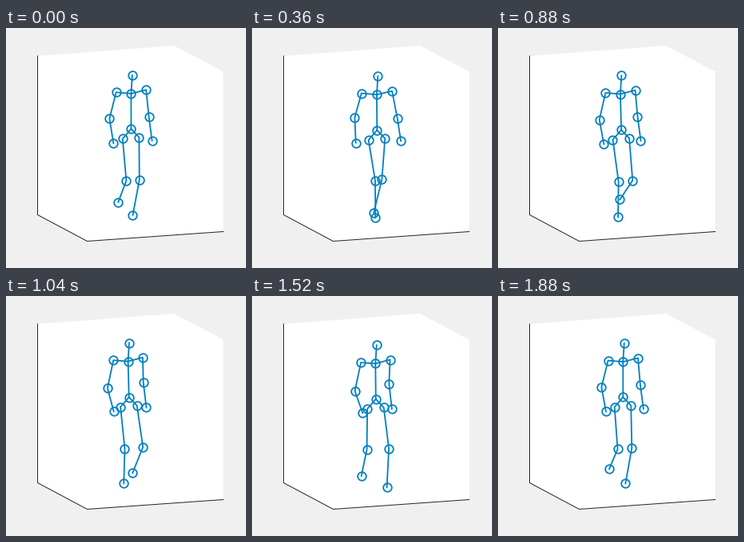
Write a matplotlib script that moves like this. It is 300x300 px and loops after 1920 ms.

```python
import numpy as np
import matplotlib.pyplot as plt
from matplotlib.animation import FuncAnimation

SIZE, DPI = 300, 100
FRAMES, STEP = 48, 40
BLUE, EDGE, BACK = "#0080c0", "#262626", "#f0f0f0"


def wave(phase, mean, amp=0, peak=0, amp2=0, peak2=0):
    """Mean plus first and second harmonic of the stride."""
    turn = 2 * np.pi
    return (mean + amp * np.cos(turn * (phase - peak))
            + amp2 * np.cos(2 * turn * (phase - peak2)))


def project(side, forward, down):
    """Body axes to screen: to the right, towards the viewer, downwards."""
    return np.array([0.935 * side + 0.353 * forward,
                     -0.08 * side + 0.182 * forward + 0.981 * down])


def segment(phase, mirror, length, swing, side):
    """Bone swinging front to back, with a little sideways drift."""
    angle = np.radians(wave(phase, *swing))
    return project(mirror * wave(phase, *side),
                   length * np.sin(angle), length * np.cos(angle))


# Each bone: length, swing angle in degrees, sideways offset.
ARM = [(36, (-12, 11, 0.71), (-5.6, 2, 0.235)),
       (31.7, (26, 14, 0.72), (1, 2.2, 0.72))]
LEG = [(52.9, (11.5, 16, 0.22, 2.5, 0.05), (1.2, 2.1, 0.55)),
       (49, (-22.8, 21.2, 0.377, 9.2, 0.209), (3.2, 0.9, 0.62))]


def chain(start, bones, phase, mirror):
    points = [start]
    for bone in bones:
        points.append(points[-1] + segment(phase, mirror, *bone))
    return points


def skeleton(t):
    """Polylines: spine, then arm and leg of each side."""
    neck = np.array([wave(t, 154.55, 2, 0.06), wave(t, 83.1, 0, 0, 1.4, 0.3)])
    head = neck + project(0, 4, -24.3)
    pelvis = neck + project(0, wave(t, 1.7, 1.7, 0.5), 45.1)
    lines = [[head, neck, pelvis]]
    # The right side repeats the left one, mirrored, half a stride later.
    for mirror, phase in ((1, t), (-1, t + 0.5)):
        shoulder = neck + project(-19.9 * mirror, wave(phase, 0, 1.4, 0.7), -3.2)
        hip = pelvis + project(-11 * mirror, -1, 11.7)
        lines.append([neck, *chain(shoulder, ARM, phase, mirror)])
        lines.append([pelvis, *chain(hip, LEG, phase, mirror)])
    return [np.array(line) for line in lines]


fig = plt.figure(figsize=(SIZE / DPI, SIZE / DPI), dpi=DPI, facecolor=BACK)
ax = fig.add_axes([0, 0, 1, 1])
ax.set(xlim=(0, SIZE), ylim=(SIZE, 0))
ax.axis("off")

box = np.array([(39.5, 35), (210, 22), (271.5, 54.5),
                (271.5, 254.5), (101.5, 266.5), (39.5, 233.5)])
ax.fill(*box.T, color="white", lw=0)
ax.plot(*box[[0, 5, 4, 3]].T, color=EDGE, lw=0.72)

bones = [ax.plot([], [], color=BLUE, lw=1.3)[0] for _ in range(5)]
dots, = ax.plot([], [], "o", ms=7.6, mfc="none", mec=BLUE, mew=1.3)


def draw(i):
    lines = skeleton(i / FRAMES)
    for bone, line in zip(bones, lines):
        bone.set_data(*line.T)
    # Limbs start on spine joints that are already marked.
    points = np.vstack([lines[0]] + [line[1:] for line in lines[1:]])
    dots.set_data(*points.T)
    return [*bones, dots]


anim = FuncAnimation(fig, draw, frames=FRAMES, interval=STEP,
                     repeat=True, repeat_delay=0, blit=False)
plt.show()
```
